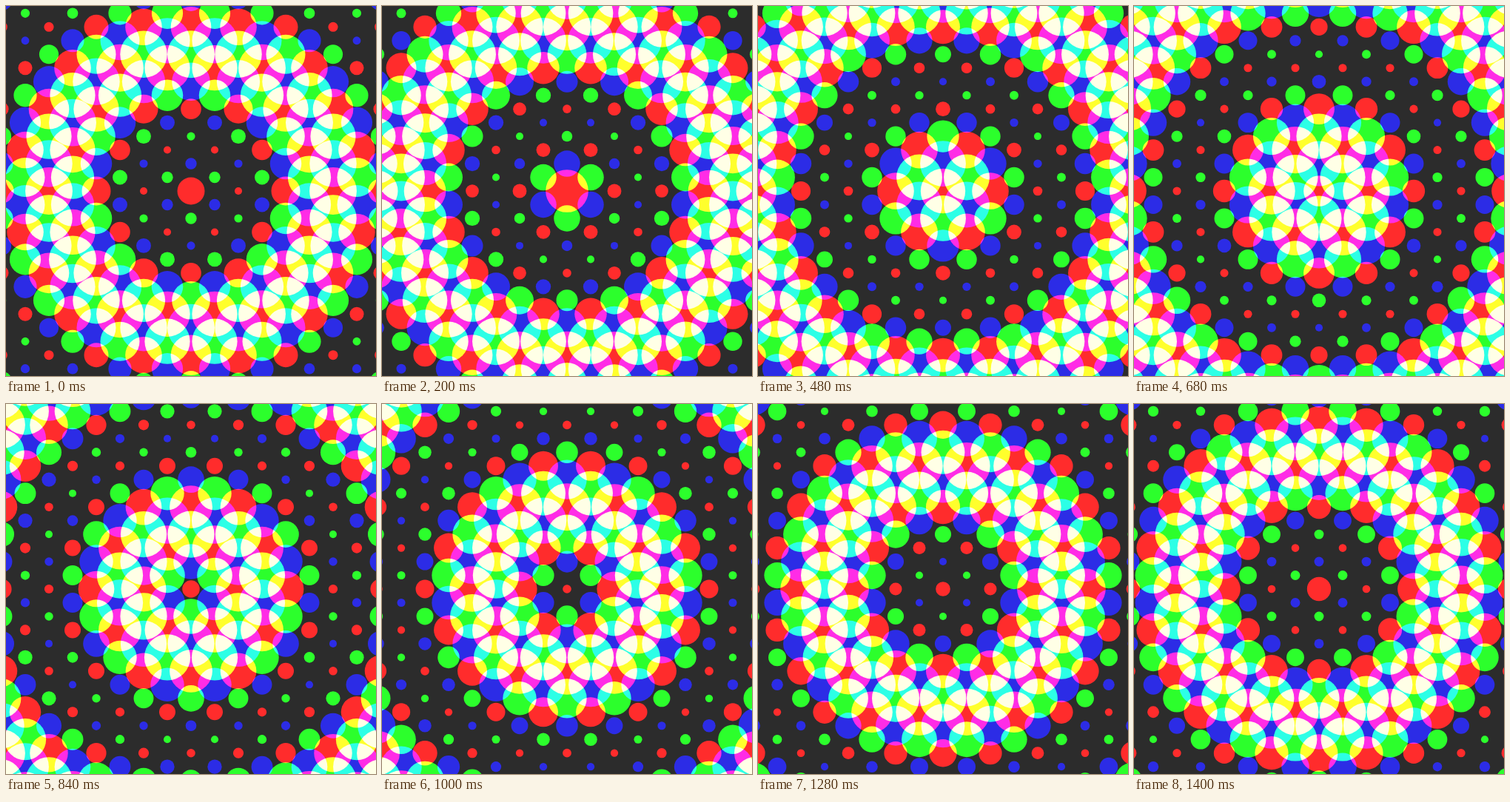
An HTML page with a canvas for the animation above (1.44 s loop, 500 px wide and 500 px high).

```html
<!DOCTYPE html>
<html lang="en">
<head>
<meta charset="utf-8">
<title>Ripple dots</title>
<style>
  html, body { margin: 0; width: 100%; height: 100%; overflow: hidden; background: #2c2c2c; }
  canvas { display: block; width: 500px; height: 500px; }
</style>
</head>
<body>
<canvas id="stage" width="500" height="500"></canvas>
<script>
const ctx = document.getElementById('stage').getContext('2d');
const SIZE = 500, CENTER = SIZE / 2;
const LOOP = 1440, STEP = 40;
const COLUMN = 32, ROW = 64 / Math.sqrt(3);
const WAVELENGTH = 250, MEAN_RADIUS = 18.5, SWING = 13.5;
const BACKGROUND = '#2c2c2c';
const COLORS = ['#ff2c2c', '#2cff2c', '#2c2ce6'];

// Triangular lattice whose three interleaved sublattices carry one colour each.
const dots = [];
for (let i = -9; i <= 9; i++) {
  for (let j = -14; j <= 14; j++) {
    const x = COLUMN * i, y = ROW * (j + i / 2);
    if (Math.abs(y) > CENTER + 34) continue;
    const color = COLORS[(j + 2 * i + 60) % 3];
    dots.push({ x: CENTER + x, y: CENTER + y, distance: Math.hypot(x, y), color });
  }
}

function draw(time) {
  ctx.globalCompositeOperation = 'source-over';
  ctx.fillStyle = BACKGROUND;
  ctx.fillRect(0, 0, SIZE, SIZE);
  ctx.globalCompositeOperation = 'lighten';
  for (const { x, y, distance, color } of dots) {
    const phase = 2 * Math.PI * (time / LOOP - distance / WAVELENGTH);
    ctx.fillStyle = color;
    ctx.beginPath();
    ctx.arc(x, y, MEAN_RADIUS + SWING * Math.sin(phase), 0, 2 * Math.PI);
    ctx.fill();
  }
}

const start = performance.now();
function tick() {
  const elapsed = (performance.now() - start) % LOOP;
  draw(Math.floor(elapsed / STEP) * STEP);
  requestAnimationFrame(tick);
}
tick();
</script>
</body>
</html>
```
